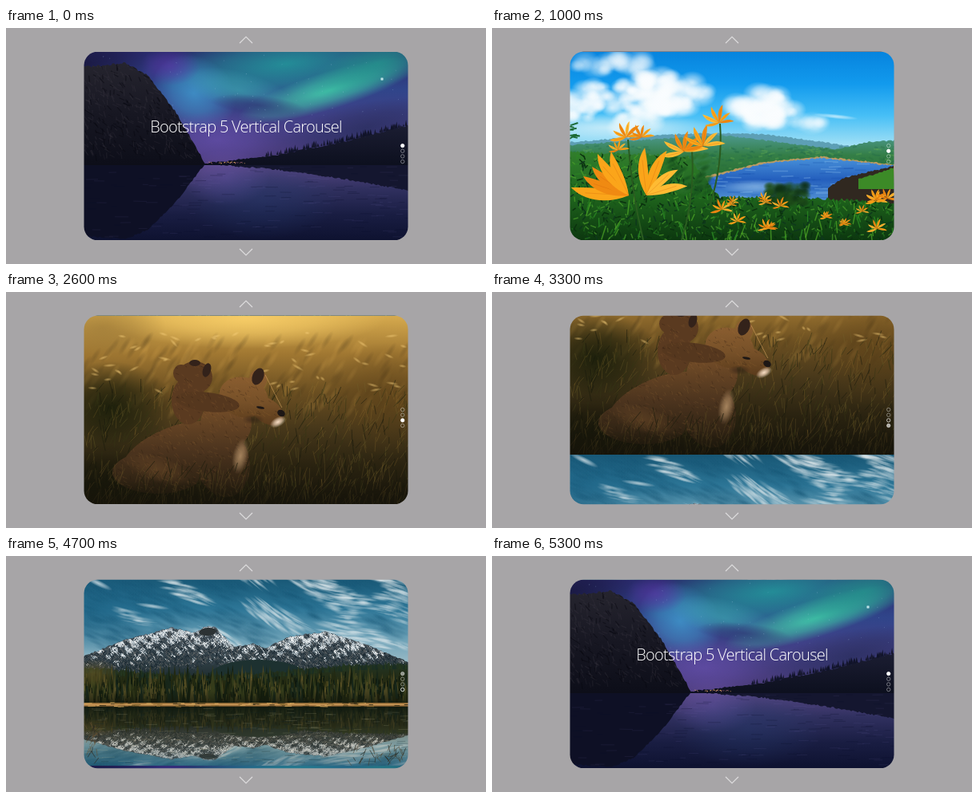
Animation, 600 px wide and 296 px high, one loop 6100 ms. Source, as an HTML page with a canvas:

```html
<!DOCTYPE html>
<html lang="en">
<head>
<meta charset="utf-8">
<title>Vertical carousel</title>
<style>
  html, body { margin: 0; width: 100%; height: 100%; overflow: hidden; background: #a7a5a7; }
  canvas { display: block; }
</style>
</head>
<body>
<canvas id="stage" width="600" height="296"></canvas>
<script>
const LOOP = 6100, SLIDE_MS = 650, STARTS = [70, 1600, 3070, 4650];
const LEFT = 97, TOP = 30, W = 406, H = 236, RIGHT = LEFT + W, BOTTOM = TOP + H;
const stage = document.getElementById('stage').getContext('2d');
let g, seed;

const rand = (a = 0, b = 1) => {
  seed = (seed * 1664525 + 1013904223) % 4294967296;
  return a + (b - a) * seed / 4294967296;
};
const pick = list => list[Math.floor(rand(0, list.length))];
const repeat = (n, draw) => { for (let i = 0; i < n; i++) draw(i); };

// Each scene is painted once, in stage coordinates.
function scene(paint, n) {
  const c = document.createElement('canvas');
  c.width = W;
  c.height = H;
  g = c.getContext('2d');
  g.translate(-LEFT, -TOP);
  seed = 77 + n;
  paint();
  return c;
}

function fade(y0, y1, ...colors) {
  const f = g.createLinearGradient(0, y0, 0, y1);
  colors.forEach((c, i) => f.addColorStop(i / (colors.length - 1), c));
  return f;
}

function band(y0, y1, ...colors) {
  g.fillStyle = fade(y0, y1, ...colors);
  g.fillRect(LEFT, y0, W, y1 - y0);
}

// Height function running straight between [x, y] points.
const through = (...pts) => x => {
  const i = Math.max(1, pts.findIndex(p => p[0] >= x));
  const [x0, y0] = pts[i - 1], [x1, y1] = pts[i];
  return y0 + (y1 - y0) * (x - x0) / (x1 - x0);
};
const mirror = (f, axis, k) => x => axis + (axis - f(x)) * k;

// Fills between a height function and a level base.
function land(fill, height, base, x0 = LEFT, x1 = RIGHT, rough = 1) {
  g.beginPath();
  g.moveTo(x0, base);
  for (let x = x0; x <= x1; x += 2) g.lineTo(x, height(x) + rand(-rough, rough));
  g.lineTo(x1, base);
  g.fillStyle = fill;
  g.fill();
}

// Fills the union of [x, y, rx, ry, angle] ellipses.
function ovals(fill, ...list) {
  g.beginPath();
  for (const [x, y, rx, ry, angle = 0] of list) {
    g.moveTo(x + rx * Math.cos(angle), y + rx * Math.sin(angle));
    g.ellipse(x, y, rx, ry, angle, 0, 7);
  }
  g.fillStyle = fill;
  g.fill();
}

function inside(draw) {
  g.save();
  g.clip();
  draw();
  g.restore();
}

// Soft elliptical glow; rgb is "r,g,b".
function glow(x, y, rx, ry, rgb, alpha, angle = 0) {
  g.save();
  g.translate(x, y);
  g.rotate(angle);
  g.scale(rx, ry);
  const f = g.createRadialGradient(0, 0, 0, 0, 0, 1);
  f.addColorStop(0, `rgba(${rgb},${alpha})`);
  f.addColorStop(.5, `rgba(${rgb},${alpha * .6})`);
  f.addColorStop(1, `rgba(${rgb},0)`);
  g.fillStyle = f;
  g.fillRect(-1, -1, 2, 2);
  g.restore();
}

function cloud(x, y, rx, ry, n, alpha = .7) {
  repeat(n, () => {
    const a = rand(0, 6.28), d = Math.sqrt(rand()), r = rand(6, 16);
    glow(x + Math.cos(a) * d * rx, y + Math.sin(a) * d * ry, r * 1.3, r, '250,253,255', alpha);
  });
}

function stroke(x, y, len, angle, color, width = 1) {
  g.strokeStyle = color;
  g.lineWidth = width;
  g.beginPath();
  g.moveTo(x, y);
  g.lineTo(x + Math.cos(angle) * len, y + Math.sin(angle) * len);
  g.stroke();
}

// Scattered short strokes: grass, rock, fur and ripples.
function strokes(n, x0, y0, x1, y1, colors, len, angle, spread = .4, width = 1) {
  repeat(n, () => stroke(rand(x0, x1), rand(y0, y1), rand(.4, 1) * len, angle + rand(-spread, spread), pick(colors), width));
}

function trees(n, x0, x1, base, hMin, hMax, colors) {
  repeat(n, () => {
    const x = rand(x0, x1), y = base(x), h = rand(hMin, hMax), w = h * .08 + .8;
    g.fillStyle = pick(colors);
    g.beginPath();
    g.moveTo(x, y - h);
    g.lineTo(x + w, y);
    g.lineTo(x - w, y);
    g.fill();
  });
}

function aurora() {
  const shore = 170;
  const cliff = through([97, 49], [150, 44], [178, 60], [212, 105], [249, shore]);
  const hill = through([247, shore], [340, 159], [420, 143], [503, 122]);

  band(TOP, shore, '#29296b', '#30458a', '#453f86', '#4b3b78');
  glow(350, 45, 165, 48, '35,150,155', .9, -.1);
  glow(405, 78, 120, 24, '67,205,170', .9, -.3);
  glow(465, 45, 90, 30, '35,148,140', .8, -.35);
  glow(235, 82, 55, 46, '63,145,200', .9, .5);
  glow(290, 78, 70, 24, '64,170,180', .6, .25);
  glow(205, 48, 38, 24, '88,55,165', .7);
  glow(265, 140, 80, 36, '107,82,180', .6);
  glow(450, 125, 110, 32, '44,48,98', .9, -.2);
  glow(315, 97, 60, 13, '45,52,115', .7, .1);
  glow(100, 45, 80, 45, '24,22,60', .85);
  strokes(60, LEFT, 32, RIGHT, 120, ['#a9c8e866'], 1, 0);
  glow(470, 64, 2.5, 2.5, '230,255,255', 1);

  band(shore, BOTTOM, '#584886', '#30305f', '#191d42', '#0e1230');
  glow(275, 188, 55, 35, '112,88,175', .45);
  glow(320, 215, 95, 50, '40,62,115', .4);
  land('#0e1025', mirror(cliff, shore, .75), shore, LEFT, 249);
  land('#14162f', mirror(hill, shore, .7), shore, 247);
  strokes(160, LEFT, 174, RIGHT, 262, ['#7b78bc18', '#080d2840'], 17, 0, .02);

  land(fade(45, shore, '#25242e', '#171722', '#0d0e19'), cliff, shore + 2, LEFT, 249, 1.5);
  inside(() => strokes(500, LEFT, 45, 245, 160, ['#51495328', '#08091180', '#35323d66'], 9, 1, .7, 1.2));
  land(fade(122, shore, '#1b1d32', '#0d101f'), hill, shore + 2, 247);
  trees(100, 325, RIGHT, hill, 3, 9, ['#11142a', '#17182f']);
  strokes(30, 247, 168, 299, 170, ['#ffb96dbb', '#e684a388'], 1.5, 0);

  g.fillStyle = '#fff';
  g.font = "300 20px 'Open Sans', 'Noto Sans', sans-serif";
  g.letterSpacing = '-0.7px';
  g.textAlign = 'center';
  g.fillText('Bootstrap 5 Vertical Carousel', 300, 131);
}

// Petals spread from a throat between two angles.
function lily(x, y, len, from, to, n = 5) {
  repeat(n, i => {
    const l = len * rand(.75, 1), angle = from + (to - from) * i / (n - 1);
    g.save();
    g.translate(x, y);
    g.rotate(angle);
    g.beginPath();
    g.moveTo(0, 0);
    g.bezierCurveTo(l * .35, -l * .17, l * .75, -l * .15, l, l * .08);
    g.bezierCurveTo(l * .7, l * .1, l * .35, l * .12, 0, 0);
    g.fillStyle = pick(['#f08a12', '#fba51a', '#ffbb33']);
    g.fill();
    g.restore();
    stroke(x, y, l * .75, angle, '#d0650e88', .6);
  });
}

function stem(x0, y0, x1, y1) {
  g.strokeStyle = '#2a5c20';
  g.lineWidth = 2;
  g.beginPath();
  g.moveTo(x0, y0);
  g.quadraticCurveTo(x0 + 4, (y0 + y1) / 2, x1, y1);
  g.stroke();
}

function lilies() {
  const meadow = through([97, 155], [245, 161], [284, 212], [380, 212], [503, 219]);
  band(TOP, 150, '#0784de', '#129aed', '#47bff6', '#a9e3f5');
  cloud(165, 98, 85, 28, 75);
  cloud(222, 82, 48, 27, 45);
  cloud(150, 46, 50, 11, 22, .4);
  cloud(340, 101, 38, 20, 50);
  cloud(392, 119, 25, 2, 8, .4);
  glow(430, 111, 28, 3, '235,250,255', .7, .1);
  glow(150, 125, 130, 18, '220,243,250', .8);

  land('#5d9fb5', x => 139 - 7 * Math.sin((x - 150) / 85) + Math.max(0, x - 340) * .06, 185);
  land(fade(134, 185, '#4d998e', '#347e47', '#297034'), through([97, 147], [285, 134], [430, 152], [470, 143], [503, 141]), 212);
  strokes(300, LEFT, 148, RIGHT, 178, ['#266d4055', '#65ae5255', '#1b614a44'], 8, .1, .4, 2);
  const farShore = through([265, 189], [340, 170], [412, 163], [503, 173]);
  land('#bc9b62', x => farShore(x) - 2, 195, 265);
  land(fade(163, 217, '#4790d9', '#245fbd', '#5393d4'), farShore, 225, 270);
  inside(() => {
    strokes(90, 270, 167, 490, 216, ['#9ecdf444', '#164da744'], 20, 0, .05, 1.5);
    glow(330, 199, 45, 9, '175,215,245', .55);
  });
  land('#302820', through([420, 200], [440, 188], [503, 173]), 225, 420);
  land('#3c8a27', through([458, 190], [503, 175]), 202, 458);

  land(fade(155, BOTTOM, '#317e2c', '#1f651d', '#0c370f'), meadow, BOTTOM, LEFT, RIGHT, 2);
  inside(() => {
    strokes(1500, LEFT, 160, RIGHT, 275, ['#0a310e', '#14501680', '#2f8a2480', '#4da02caa', '#0e371c'], 8, -1.5, 1.4, 1.5);
    strokes(60, LEFT, 213, RIGHT, 275, ['#55b028aa', '#267d20'], 20, -1.5, .5, 1.5);
  });
  repeat(65, () => glow(rand(340, 392), rand(197, 219), 8, 6, pick(['13,48,20', '29,75,24']), .8));
  repeat(60, () => glow(rand(215, 270), rand(160, 210), 9, 4, pick(['20,75,28', '40,110,40']), .7, -.5));
  strokes(9, 96, 120, 103, 139, ['#1d6b37'], 10, -.2, .5, 2);

  stem(170, 140, 189, BOTTOM);
  stem(250, 155, 237, BOTTOM);
  stem(285, 120, 272, 223);
  for (const [x, y, size] of [[168, 137, 24], [187, 137, 18], [158, 153, 15], [240, 155, 31], [264, 148, 30], [284, 119, 24]])
    lily(x, y, size, 2.9, 6.1, 6);
  lily(171, 210, 73, 3.2, 4.25, 5);
  lily(193, 210, 62, 4.6, 5.98, 4);
  repeat(18, () => lily(rand(285, 495), rand(207, 252), rand(7, 17), 2.8, 6.4, 6));
}

function lions() {
  const fur = (fill, ...parts) => {
    ovals(fill, ...parts);
    inside(() => strokes(1200, 125, 78, 355, 260, ['#bd854622', '#20160f40', '#8b5e3030'], 6, .8, .6));
  };
  band(TOP, BOTTOM, '#d6aa4e', '#a17832', '#6b4f21', '#46371a', '#292210', '#15130a');
  glow(300, 33, 175, 38, '250,208,105', .9);
  glow(120, 45, 80, 42, '133,104,50', .45);
  repeat(150, () => glow(rand(LEFT, RIGHT), rand(60, 150), 14, 4, pick(['220,170,80', '60,45,20']), .2, -1));
  glow(130, 145, 80, 58, '25,29,10', .95);
  glow(475, 135, 80, 72, '92,64,23', .5);
  strokes(900, LEFT, 125, RIGHT, 280, ['#73632d55', '#36351688', '#b0873a33', '#17190d88'], 20, -1.3, .55);
  repeat(50, () => glow(rand(LEFT, RIGHT), rand(48, 125), rand(3, 9), 2, '250,210,125', .5, rand(-.6, .9)));
  glow(115, 240, 145, 50, '18,19,8', .65);

  fur(fade(150, 255, '#6f4a27', '#49321d', '#241c0f'),
    [275, 165, 32, 32], [212, 203, 72, 34, -.38], [190, 226, 57, 27], [270, 212, 34, 46, -.25]);
  fur('#5a3a20', [236, 107, 22, 20], [228, 136, 21, 30], [219, 102, 10, 11]);
  fur(fade(105, 172, '#8b5e30', '#765028', '#553719'), [297, 132, 31, 25, .3], [326, 149, 23, 15, .65], [315, 110, 11, 13]);
  fur('#55371e', [252, 138, 40, 12, .12]);
  ovals('#33221a', [236, 89, 7, 4], [251, 98, 5, 9, .3], [315, 106, 7, 11, .4]);
  ovals('#1d1715', [344, 152, 5, 4, .5], [318, 145, 5, 1.5, .2]);
  glow(340, 163, 11, 6, '255,231,205', .95, -.5);
  glow(293, 206, 10, 23, '204,165,119', .7, .2);
  glow(309, 160, 14, 6, '44,29,19', .6);
  glow(190, 222, 45, 17, '145,97,52', .3, .3);
  stroke(324, 104, 46, 1.1, '#d3a05e99');
  strokes(350, LEFT, 225, RIGHT, 285, ['#5c4c2566', '#23200fcc', '#8b703833'], 25, -1.35, .5);
  band(235, BOTTOM, '#17140a00', '#17140aaa');
}

function mountains() {
  const shore = 190;
  const ridge = through([97, 129], [146, 109], [207, 93], [237, 99], [250, 91], [262, 93], [285, 117], [311, 113], [323, 119], [355, 104], [400, 98], [450, 114], [503, 136]);
  const forest = x => 146 + 7 * Math.sin((x - 130) / 75);

  band(TOP, 145, '#175674', '#2c7596', '#6ba0b6', '#a5c1ca');
  glow(120, 75, 85, 55, '28,98,132', .7);
  // Cirrus gathers where two crossing waves add up, denser to the right.
  repeat(2200, () => {
    const x = rand(LEFT, RIGHT), y = rand(TOP, 120);
    const density = Math.sin(x * .035 - y * .13) + Math.sin(x * .07 - y * .05 + 1) + (x - 320) / 170;
    if (density > .5) glow(x, y, rand(6, 18), rand(1, 3), pick(['240,244,244', '205,220,226']), .3, .4 + .3 * Math.sin(x / 40));
    else if (density < -.3) glow(x, y, 12, 3, '20,84,116', .12, .4);
  });
  glow(115, 37, 20, 4, '240,245,247', .7, .45);
  glow(183, 66, 22, 3, '230,238,240', .7, .15);

  land(fade(92, 157, '#56606a', '#36454d', '#1f2d30'), ridge, 170);
  inside(() => {
    // Snow thins out with depth below the ridge, broken by slanting gullies.
    repeat(9000, () => {
      const x = rand(LEFT, RIGHT), depth = Math.pow(rand(), 1.3) * 46, y = ridge(x) + depth;
      const gully = Math.sin(x * .5 - depth * .45) + Math.sin(x * .23 + depth * .3) + rand(-.8, .8);
      const snow = gully > depth / 13 - 1.1 + Math.max(0, ridge(x) - 106) / 9;
      stroke(x, y, rand(1, 4), pick([.7, 1, 2.2]), pick(snow ? ['#f4f6f6', '#dce3e6', '#aab8c0'] : ['#1b2831', '#34414a', '#5e6263']), 1);
    });
  });
  ovals('#2c3234', [252, 98, 11, 5, -.1]);
  ovals('#1d3130', [315, 155, 62, 22]);
  land(fade(140, shore, '#223322', '#25290f', '#1c1c0c'), forest, shore, LEFT, RIGHT, 2);
  trees(200, LEFT, RIGHT, x => forest(x) + 6, 5, 11, ['#24361f', '#1b2e24']);
  repeat(3, i => trees(200, LEFT, RIGHT, () => 176 + i * 6, 14, 38 - i * 3, ['#141e0e', '#232a12', '#4a4622', '#18271a', '#353c1b']));
  strokes(300, LEFT, 155, RIGHT, 186, ['#8d77335a', '#0d170d'], 8, -1.57, .1);
  glow(110, 150, 32, 18, '130,105,45', .45);
  band(172, shore, '#12160a00', '#12160abb');

  // Water mirrors the view above the shore, slightly squashed.
  const view = shore - TOP, squash = .7;
  g.save();
  g.translate(0, shore + shore * squash);
  g.scale(1, -squash);
  g.drawImage(g.canvas, 0, 0, W, view, LEFT, TOP, W, view);
  g.restore();
  band(shore, BOTTOM, '#0c1810bb', '#2a2a1a88', '#6b592c33', '#1e485c66');
  strokes(260, LEFT, 194, RIGHT, 263, ['#16262a44', '#c4bc9c28'], 16, 0, .03);
  band(187, 192, '#7b5a2c', '#cf9a58', '#4f3a1c');
  strokes(90, LEFT, 187, RIGHT, 192, ['#d3a55d', '#8b6a31', '#40351b'], 10, 0, .05);
  strokes(28, 100, 218, 118, BOTTOM, ['#2e2b23aa', '#66503288'], 12, -1.4, .8);
  strokes(40, 430, 247, 500, BOTTOM, ['#292b23aa', '#493e2a88'], 12, -1.4, 1);
}

const slides = [aurora, lilies, lions, mountains].map(scene);

// cubic-bezier(.42, 0, .58, 1)
function easeInOut(x) {
  let lo = 0, hi = 1;
  for (let i = 0; i < 20; i++) {
    const s = (lo + hi) / 2, q = 1 - s;
    if (1.26 * s * q * q + 1.74 * s * s * q + s ** 3 < x) lo = s; else hi = s;
  }
  return lo * lo * (3 - 2 * lo);
}

function chevron(tip, dir) {
  stage.strokeStyle = '#dddcdd';
  stage.lineWidth = 1.2;
  stage.beginPath();
  stage.moveTo(292, tip - 8 * dir);
  stage.lineTo(300, tip);
  stage.lineTo(308, tip - 8 * dir);
  stage.stroke();
}

function dot(i, active, opacity) {
  stage.globalAlpha = opacity;
  stage.beginPath();
  stage.arc(495.7, 147.6 + i * 6.65, 2.2, 0, 7);
  stage.strokeStyle = stage.fillStyle = '#fff';
  stage.lineWidth = .8;
  if (active) stage.fill();
  stage.stroke();
  stage.globalAlpha = 1;
}

function draw(t) {
  const step = STARTS.filter(s => s <= t).length;
  const p = step ? easeInOut(Math.min(1, (t - STARTS[step - 1]) / SLIDE_MS)) : 1;
  const now = step % 4, old = (step + 3) % 4;
  stage.fillStyle = '#a7a5a7';
  stage.fillRect(0, 0, 600, 296);
  chevron(11, -1);
  chevron(285, 1);

  stage.save();
  stage.beginPath();
  stage.roundRect(97.5, TOP - .3, 405, H + .6, 17);
  stage.clip();
  const shift = Math.round(p * H);
  if (p < 1) stage.drawImage(slides[old], LEFT, TOP - shift);
  stage.drawImage(slides[now], LEFT, TOP + H - shift);
  stage.restore();

  repeat(4, i => dot(i, i === now, i === now ? .5 + p / 2 : i === old ? 1 - p / 2 : .5));
}

function tick() {
  draw(performance.now() % LOOP);
  requestAnimationFrame(tick);
}
tick();
</script>
</body>
</html>
```
